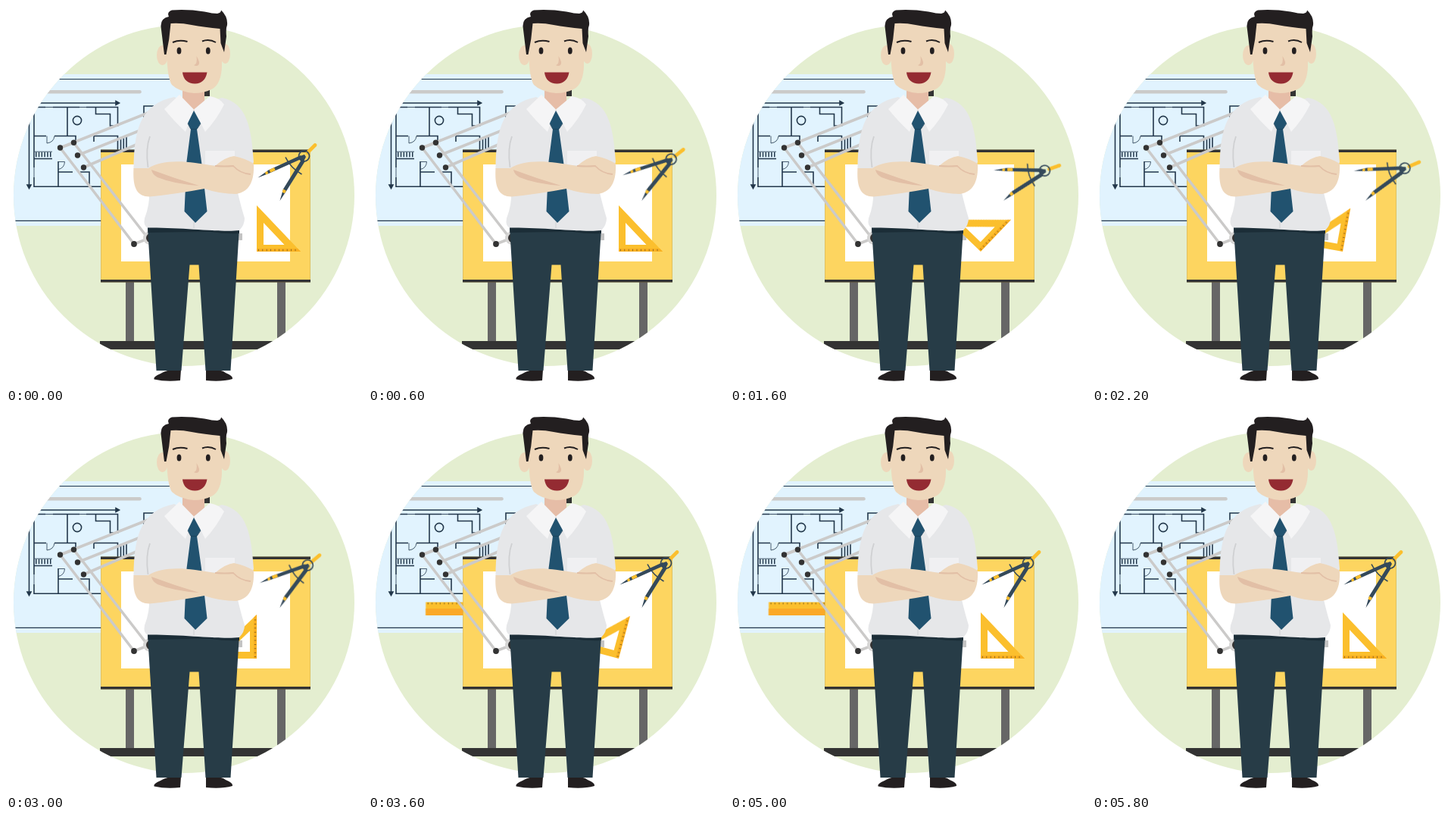
An HTML page without scripts for the animation above (6 s loop, 470x500 px).

```html
<!DOCTYPE html>
<html lang="en">
<head>
<meta charset="utf-8">
<title>Architect</title>
<style>
  html, body { margin: 0; width: 100%; height: 100%; overflow: hidden; background: #fff; }
  svg { display: block; width: 470px; height: 500px; }

  .ink { fill: none; stroke: #22374a; stroke-width: 1.6; }
  .thin { stroke-width: .8; }
  .rule { stroke-width: 1.2; }
  .dark { fill: #333; }
  .arms { fill: none; stroke: #cbcac9; stroke-width: 3.6; stroke-linecap: round; }
  .skin { fill: #eed7bb; }
  .hair { fill: #231f20; }
  .brow { fill: none; stroke: #231f20; stroke-width: 2; }
  .shirt { fill: #e6e7e9; }
  .steel { fill: #34495a; }
  .gold { fill: #fbbf2d; }
  .tick { fill: none; stroke: #7a5a1c; stroke-width: 2.6; stroke-dasharray: .8 4.6; }

  .compass, .ruler { animation: compass 6s cubic-bezier(.37, 0, .63, 1) infinite; }
  .compass { transform-origin: 362px 256px; }
  .triangle { transform-origin: 331px 324px; animation: triangle 6s infinite; }
  .ruler { animation-name: ruler; }

  @keyframes compass {
    0%, 58.33%, 100% { transform: rotate(0deg); }
    29.17% { transform: rotate(26deg); }
  }
  @keyframes triangle {
    0%, 80.33%, 100% { transform: rotate(0deg); }
    14.5% { transform: rotate(0deg); animation-timing-function: cubic-bezier(.33, .33, .6, 1); }
    45.45% { transform: rotate(-90deg); }
    49.38% { transform: rotate(-90deg); animation-timing-function: cubic-bezier(.4, 0, .67, .67); }
  }
  @keyframes ruler {
    0%, 48.33%, 99.17%, 100% { transform: translateX(93px); }
    70%, 77.5% { transform: translateX(0); }
  }
</style>
</head>
<body>
<svg viewBox="0 0 470 500">
  <defs>
    <clipPath id="disc"><circle cx="235" cy="250" r="225"/></clipPath>
  </defs>

  <g clip-path="url(#disc)">
    <rect width="470" height="500" fill="#e4eed0"/>

    <!-- blueprint -->
    <rect y="90" width="240" height="200" fill="#e1f3fe"/>
    <path class="ink rule" d="M0 96.500H240M0 283.300H126"/>
    <path d="M40 113.200H176.500" stroke="#cbcac9" stroke-width="4.600" stroke-linecap="round"/>
    <g class="ink">
      <path d="M30.500 140V237M40 128H146"/>
      <path d="M145 125.500l4.500 2.500-4.500 2.500zM28 236l2.500 4.500 2.500-4.500z" fill="#22374a"/>
      <path d="M37 140V238.300H126M37 133.500H147.500V158H137.500V142.500H118.500V134M81 133.500V171.500M37 171.500H53M64 171.500H92V179M37 201.500H61M69 205V238M69 219H88M98 219H110V238M116 171.500H147.500V190M116 171.500V179M195 132H182V148"/>
      <circle cx="94" cy="151" r="5.600"/>
      <path d="M151.500 173V190M155.300 173V190M159 173V190"/>
      <path d="M39 196H61" stroke-width="6.500" stroke-dasharray="1.500 2.300"/>
      <path class="thin" d="M38 192.200H61M54 171.500V181Q63 180 64 171.500M69 205.500H77.500Q77 214 69 215.500"/>
    </g>
    <path d="M52 133.500H62M97 133.500H106M37 213V226" stroke="#e1f3fe" stroke-width="2.600"/>
    <path class="ink thin" d="M52 133.500H62M97 133.500H106M37 213V226"/>

    <g class="ruler">
      <rect class="gold" x="35.500" y="249.500" width="100" height="17.500"/>
      <rect x="35.500" y="258" width="100" height="9" fill="#fba927"/>
      <path class="tick" d="M38 251.300H134"/>
    </g>

    <!-- drawing board -->
    <path d="M158 364h11v80h-11zM358 364h11v80h-11z" fill="#666"/>
    <path class="dark" d="M124 442H358V453H124z"/>
    <path d="M125.500 190H401.500V364H125.500z" fill="#fdd560" stroke="#d9b44b" stroke-width=".7"/>
    <path class="dark" d="M125 189.500H402V193H125zM125 361H402V364.500H125z"/>
    <path d="M152 209H375V337H152z" fill="#fff"/>
  </g>

  <!-- lamp -->
  <path class="arms" d="M71.500 187L190 140M94.500 197L195 157M102.500 213L195 173M71.500 187L169 314M89.500 180.500L184 302M71.500 187L89.500 180.500M169 314L190 306"/>
  <circle cx="190" cy="306" r="9" fill="#d6d5d4"/>
  <circle class="dark" cx="191" cy="306" r="6"/>
  <g class="dark">
    <circle cx="71.500" cy="187" r="3.700"/>
    <circle cx="89.500" cy="180.300" r="3.700"/>
    <circle cx="94.500" cy="197" r="3.700"/>
    <circle cx="102.500" cy="213" r="3.700"/>
    <circle cx="169" cy="314" r="3.900"/>
    <path d="M260 111h9v8h-9z"/>
  </g>
  <path d="M300 300h12v9h-12z" fill="#c4c4c4"/>

  <g class="triangle">
    <path class="gold" fill-rule="evenodd" d="M331 263L389 324H331zM340 286V315H367.500z"/>
    <path d="M331 320H385.200L389 324H331z" fill="#f9b021"/>
    <path class="tick" d="M333 322H386"/>
  </g>

  <g class="compass">
    <path d="M398 193.500L408 183.500" stroke="#fbbf2d" stroke-width="4.600" stroke-linecap="round"/>
    <path d="M369 199.500Q376 214 390.500 222" fill="none" stroke="#34495a" stroke-width="1.700"/>
    <path class="steel" d="M389 197L390.500 201.500 348 220.500 332.500 226.500 346.500 216.500zM390.500 202L395 204.500 370.500 243.500 361.500 257 366 241.500z"/>
    <path class="gold" d="M347.500 216l6.500-3 1.700 3.800-6.500 3zM342 219.400l3-1.700 1.300 3.500-3.300 1.300zM366 241.500l4 2.200-2.300 3.600-3-1.800z"/>
    <circle cx="393.500" cy="198" r="7" fill="none" stroke="#34495a" stroke-width="1.700"/>
    <path class="steel" d="M388 198l6-2 2 3-3 6-4-1z"/>
  </g>

  <!-- trousers and shoes -->
  <path class="hair" d="M231 480Q213 479 204 485Q194 489 195.500 492.500Q211 496 230 494zM264 480Q283 478 290 484Q300 488 299 492Q285 496 264 494z"/>
  <path d="M187 292H308L296.500 481H263.500L254.500 341.500H242.500L231.500 481H198.500z" fill="#273c47"/>
  <path d="M187 291L308 295V300Q290 301 270 298Q230 298 187.500 299z" fill="#1b2d37"/>

  <!-- shirt -->
  <path class="shirt" d="M222 120Q248 135 285 121C318 128 324 160 327 206L306 246Q309 260 315 280Q315 289 308 296C285 299 235 292 187 292.500Q181 290 183 280Q190 262 189 245L168.500 215C169 158 180 129 222 120z"/>
  <path d="M190 172Q184 188 187.500 213" fill="none" stroke="#cfd0d2" stroke-width="1.800"/>
  <path d="M263 191h39v19h-39z" fill="#f0f0f2"/>
  <path d="M248 285V293" stroke="#cfd0d2"/>
  <path d="M233 112H262V126L248 138 233 126z" fill="#e6bda7"/>
  <path d="M229 117L248 136.500 237 166Q220 150 209 136zM269 119L248 136.500 263 166Q278 150 288 130Q282 121 269 119z" fill="#f5f5f6"/>
  <path d="M248 138L257 154.500 252 162.500 258 205 265.500 271 250 286 235.500 271 238.500 205 244 162.500 240 154.500z" fill="#21526f"/>
  <path d="M240 155L244 162.500H252L257 155" fill="none" stroke="#183f58" stroke-width=".8"/>

  <!-- folded arms -->
  <path class="skin" d="M168.500 214H188C200 206 222 203 250 207Q264 209 276 211Q290 199 301 198Q316 201 327 208C328 230 322 245 304 248Q282 248 262 241Q225 248 190 251.500C172 252 167 238 168.500 214z"/>
  <path d="M192 216Q224 228 255 237Q222 235 200 226Q193 222 192 216z" fill="#e2bfa6"/>
  <path d="M276 211Q290 212 300 211Q309 221 323 222" fill="none" stroke="#e2bfa6" stroke-width="1.800"/>

  <!-- head -->
  <ellipse class="skin" cx="206.500" cy="65" rx="7.500" ry="13"/>
  <ellipse class="skin" cx="289.500" cy="63" rx="6.500" ry="13"/>
  <path class="skin" d="M212 20H285V80Q284 102 273 109Q262 115 248 115Q228 113 219 104Q213 96 212 60z"/>
  <path class="hair" d="M209 64L204.500 27Q204 16 215 14Q212 8 219 5.500Q240 4 262 7.500Q273 10 279 10Q284 9 284 5.500Q293 14 292 25Q290 30 291 40L288 61L283.500 49L282.500 30Q262 28 245 25Q231 22 217.500 23Q216 44 211.500 64z"/>
  <path class="brow" d="M220 48Q229 44 239.500 47M259 46.500Q268 43 277 48"/>
  <ellipse class="hair" cx="228.500" cy="59" rx="2.900" ry="4.500"/>
  <ellipse class="hair" cx="266.800" cy="59" rx="2.900" ry="4.500"/>
  <path d="M251.500 66Q257 75 254 78Q251 80 248 78Q253 77 251.500 66z" fill="#e2bfa6"/>
  <path d="M233 87.500H265.500C264 97 258 102.500 249.500 102.500C240 102.500 234 97 233 87.500z" fill="#942b32"/>
</svg>
</body>
</html>
```
